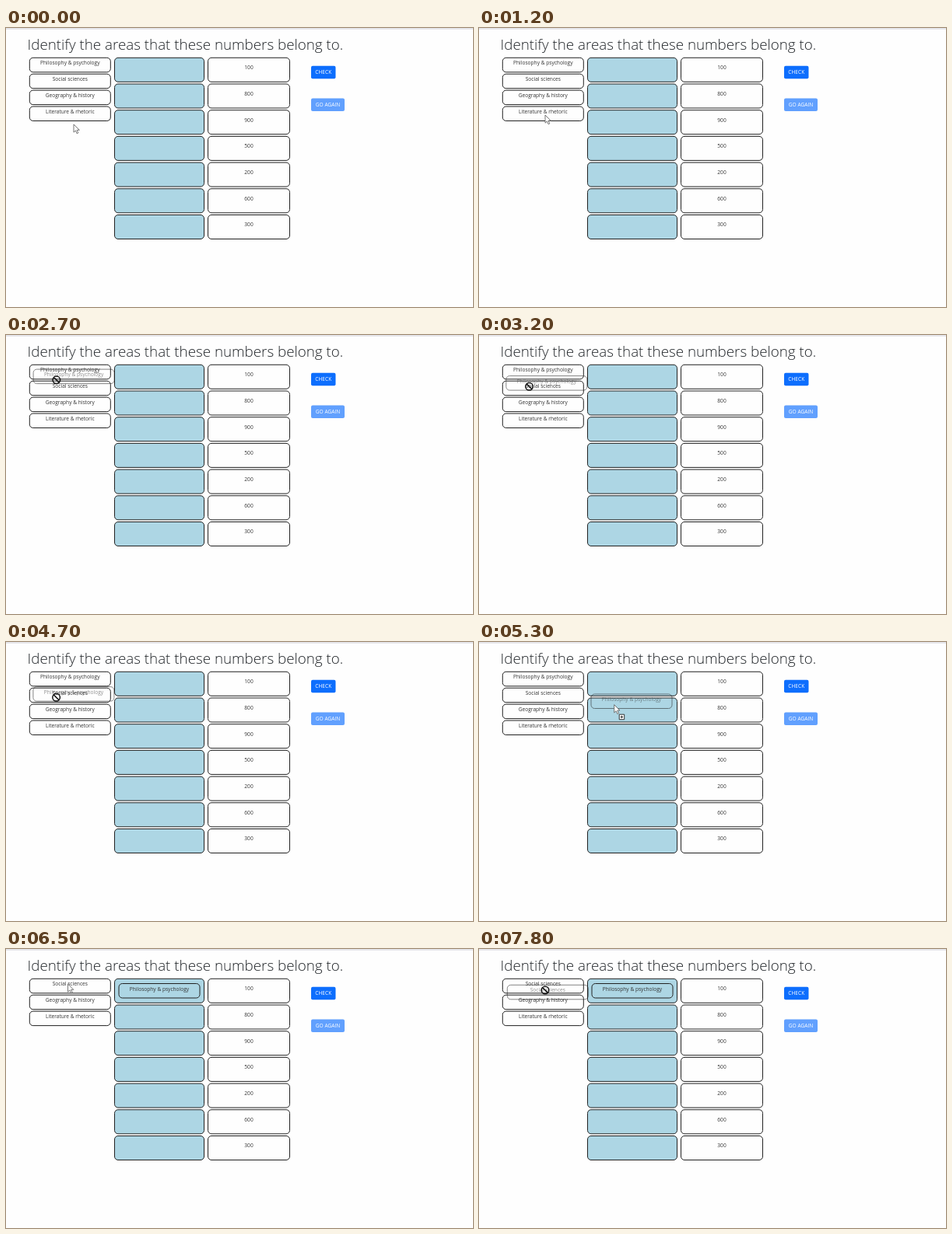
These frames come from a looping animation (600 px wide and 359 px high, 8 s). An HTML page:

```html
<!DOCTYPE html>
<html lang="en">
<head>
<meta charset="utf-8">
<title>Match the areas</title>
<style>
  html, body { margin: 0; width: 100%; height: 100%; overflow: hidden; background: #fefefe; }
  svg { display: block; width: 600px; height: 359px; }
  text { font: 6.6px "Open Sans", "Noto Sans", sans-serif; fill: #333; text-anchor: middle; }
  .title { font-size: 18.8px; font-weight: 300; fill: #212529; text-anchor: start; }
  .box { fill: none; stroke: #222; }
  .drop { fill: #add6e4; }
  .label { fill: #fff; }
  .ghost { opacity: .55; }
</style>
</head>
<body>
<svg id="stage" viewBox="0 0 600 359">
  <rect width="600" height="2" fill="#e6e6eb"/>
  <text class="title" x="27.5" y="28">Identify the areas that these numbers belong to.</text>
</svg>
<script>
const LOOP = 8000, STEP = 100, DROP = 5600;
const stage = document.getElementById('stage');

function add(parent, tag, attrs = {}, text = '') {
  const el = document.createElementNS('http://www.w3.org/2000/svg', tag);
  for (const name in attrs) el.setAttribute(name, attrs[name]);
  el.textContent = text;
  parent.append(el);
  return el;
}

const move = (el, x, y) => el.setAttribute('transform', `translate(${x} ${y})`);
const show = (el, on) => el.style.display = on ? '' : 'none';

function box(x, y, width, height, type = '') {
  add(stage, 'rect', { x, y, width, height, rx: 4.5, class: 'box ' + type });
}

function card(text, type = '') {
  const g = add(stage, 'g', { class: type });
  add(g, 'rect', { width: 104, height: 18.5, rx: 4.5, class: 'box' });
  add(g, 'text', { x: 52, y: 9 }, text);
  return g;
}

function button(text, y, width, fill) {
  add(stage, 'rect', { x: 392, y, width, height: 16.5, rx: 2, fill });
  add(stage, 'text', { x: 392 + width / 2, y: y + 10.6, class: 'label' }, text);
}

[100, 800, 900, 500, 200, 600, 300].forEach((number, i) => {
  const y = 38.3 + i * 33.7;
  box(139.5, y, 115, 31, 'drop');
  box(259.5, y, 105, 31);
  add(stage, 'text', { x: 312, y: y + 14.8 }, number);
});
button('CHECK', 48.7, 31.5, '#0d6efd');
button('GO AGAIN', 90.4, 43, '#61a0fe');

const areas = ['Philosophy & psychology', 'Social sciences', 'Geography & history', 'Literature & rhetoric'];
const cards = areas.map(name => card(name));

// Each drag: which card, when it is held, and where it was grabbed
const drags = [
  { from: 2700, to: DROP, x: 60, y: 52, ghost: card(areas[0], 'ghost') },
  { from: 7200, to: LOOP, x: 79, y: 45, ghost: card(areas[1], 'ghost') }
];

const pointer = add(stage, 'g');
const arrow = add(pointer, 'path', {
  d: 'M0 0V10.2L2.4 8L4.1 11.8L5.8 11L4.1 7.3H7.3Z',
  fill: '#fff', stroke: '#555', 'stroke-width': .8
});
const plus = add(pointer, 'path', {
  d: 'M6.5 12.5h6.5v6.5h-6.5zM9.75 14v3.5M8 15.75h3.5', fill: '#fff', stroke: '#222', 'stroke-width': .9
});
const barred = add(pointer, 'path', {
  d: 'M-4.8 0a4.8 4.8 0 1 0 9.6 0a4.8 4.8 0 1 0 -9.6 0M-3.4 -3.4L3.4 3.4',
  fill: 'none', stroke: '#111', 'stroke-width': 1.5
});

// Pointer path: time, x, y
const path = [
  [0, 87, 124], [1100, 87, 124], [1200, 85, 112], [2000, 70, 84], [2400, 60, 52],
  [2600, 60, 52], [2700, 64.8, 57.8], [3300, 64.5, 68], [4600, 64.5, 68],
  [4700, 64.6, 71.3], [5300, 173.7, 80.7], [5500, 176, 62], [DROP, 176, 62],
  [6400, 79.5, 45], [7100, 79.5, 45], [7800, 85, 53], [LOOP, 85, 53]
];

function pointAt(t) {
  const i = path.findIndex(key => key[0] > t);
  const [t0, x0, y0] = path[i - 1], [t1, x1, y1] = path[i];
  const k = (t - t0) / (t1 - t0);
  return [x0 + (x1 - x0) * k, y0 + (y1 - y0) * k];
}

function draw(now) {
  const t = Math.floor(now % LOOP / STEP) * STEP;
  const [x, y] = pointAt(t);
  const dropped = t >= DROP;

  cards.forEach((el, i) => {
    if (dropped && i === 0) move(el, 145, 44.5);
    else move(el, 30.3, 38.3 + (dropped ? i - 1 : i) * 20.9);
  });

  let held = false;
  for (const d of drags) {
    const on = t >= d.from && t < d.to;
    show(d.ghost, on);
    move(d.ghost, 30.3 + x - d.x, 38.3 + y - d.y);
    held = held || on;
  }

  const overDrop = x > 139 && x < 255;
  show(arrow, !held || overDrop);
  show(plus, held && overDrop);
  show(barred, held && !overDrop);
  move(pointer, x, y);
  requestAnimationFrame(draw);
}
requestAnimationFrame(draw);
</script>
</body>
</html>
```
